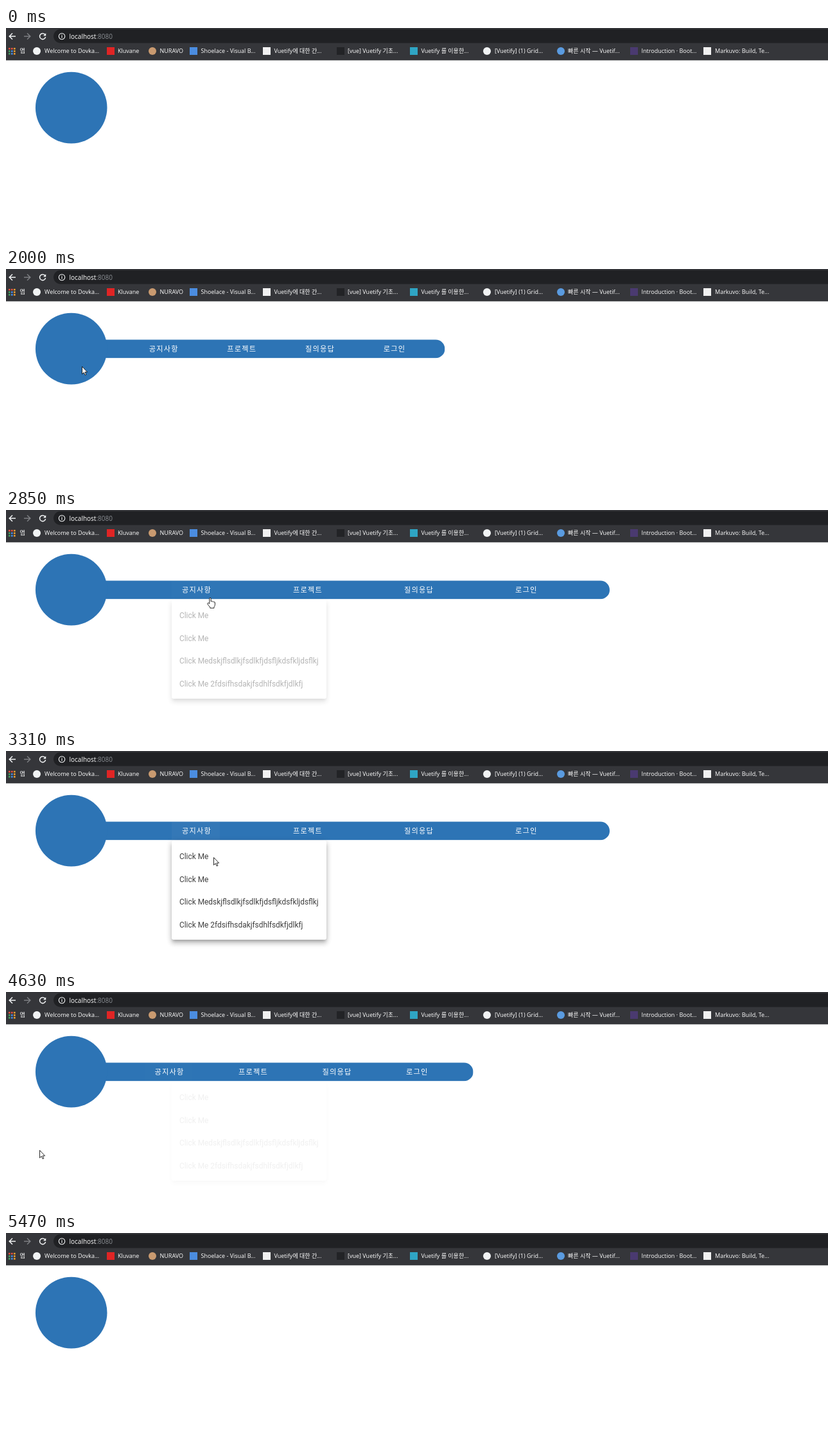
An HTML page that plays this animation: 1280 by 333 pixels, repeating every 7110 ms.

```html
<!DOCTYPE html>
<html lang="ko">
<head>
<meta charset="utf-8">
<style>
html, body { margin: 0; width: 100%; height: 100%; overflow: hidden; background: #fff; }
svg { display: block; position: absolute; left: 0; top: 0; overflow: hidden; }
text { font-family: 'Open Sans', 'Noto Sans CJK KR', 'Noto Sans CJK', sans-serif; fill: #fff; }
#marks text { font-size: 9px; }
#labels text { font: 500 11.2px Roboto, 'Noto Sans CJK KR', 'Noto Sans CJK', sans-serif; letter-spacing: 1.2px; }
#menu {
  position: absolute; left: 258px; top: 140px; width: 241px; height: 155px;
  box-sizing: border-box; padding: 8px 12px 0; border-radius: 3px; background: #fff;
  font: 11.88px/35.7px Roboto, sans-serif; color: rgba(0,0,0,.76); white-space: nowrap;
  box-shadow: 0 4px 4px -2px rgba(0,0,0,.2), 0 6px 7px 1px rgba(0,0,0,.14), 0 2px 10px 1px rgba(0,0,0,.12);
}
</style>
</head>
<body>
<svg width="1280" height="333">
  <rect width="1280" height="50" fill="#35363a"/>
  <rect y="49.5" width="1280" height="1" fill="#292a2d"/>
  <rect x="74" y="2" width="1240" height="21.5" rx="10.75" fill="#202124"/>
  <g fill="none" stroke="#f1f3f4" stroke-width="1.5">
    <path d="M15 13H5.5M10 8.2L5.2 13l4.8 4.8"/>
    <path d="M28 13h9.5M33 8.2l4.8 4.8-4.8 4.8" stroke="#7d7f83"/>
    <path d="M60.6 10A4.6 4.6 0 1 0 61.6 14"/>
    <path d="M62.2 8v4.2H58z" fill="#f1f3f4" stroke="none"/>
    <circle cx="87" cy="13" r="4.7" stroke-width="1.1"/>
    <path d="M87 12.3v3.2M87 10.2v1.2" stroke-width="1.2"/>
  </g>
  <text x="98.5" y="16.5" font-size="10" font-weight="500">localhost<tspan fill="#8b8f94">:8080</tspan></text>
  <g id="marks"></g>
  <svg id="bar" x="75" y="110" height="29.5">
    <rect id="fill" x="0" y=".5" height="28.8" rx="14.4" fill="#2d74b5"/>
    <rect id="hover" width="75" y=".5" height="28.8" fill="#fff"/>
    <g id="labels"></g>
  </svg>
  <circle cx="101.7" cy="124.6" r="55.8" fill="#2d74b5"/>
</svg>
<div id="menu">Click Me<br>Click Me<br>Click Medskjflsdlkjfsdlkfjdsfljkdsfkljdsflkj<br>Click Me 2fdsifhsdakjfsdhlfsdkfjdlkfj</div>
<svg width="1280" height="333">
  <g id="cursor" fill="#fff" stroke="#111" stroke-width=".9" stroke-linejoin="round">
    <path id="arrow" d="M.5 .5V12.3l2.7-2.5 1.9 4.1 1.8-.8-1.9-4H8.6z"/>
    <path id="hand" d="M-1.2 9.5V1Q0-.6 1.2 1V6Q2.4 5 3.4 6.3 4.7 5.4 5.5 6.8 7.3 6.2 7.4 8V11.5Q7 13.5 6 14.5V16.3H-.2V15Q-2.6 12.6-4.2 9.8-4.2 7.6-2.4 8.4z"/>
  </g>
</svg>
<script>
const $ = id => document.getElementById(id);
const LOOP = 7110, FIRST = 910, STEP = 77, FULL = 865;
const ENTER = 1573, OPEN = 2794, LEAVE = 4428, GONE = 5453;

// Bookmarks: icon x, icon colour, round?, text x, title
const marks = [
  [42, '#f1f3f4', 1, 60, 'Welcome to Dovka...'],
  [157, '#e02525', 0, 174, 'Kluvane'],
  [222, '#c99a70', 1, 239.5, 'NURAVO'],
  [286, '#4b8de0', 0, 303.5, 'Shoelace - Visual B...'],
  [400, '#f1f1f1', 0, 417.5, 'Vuetify에 대한 간...'],
  [515, '#222326', 0, 532, '[vue] Vuetify 기초...'],
  [629, '#2fa5c4', 0, 646.5, 'Vuetify 를 이용한...'],
  [743, '#f1f3f4', 1, 761, '[Vuetify] (1) Grid...'],
  [858, '#5a9be0', 1, 875, '빠른 시작 — Vuetif...'],
  [972, '#4a3a70', 0, 989.5, 'Introduction · Boot...'],
  [1086, '#f1f1f1', 0, 1104, 'Markuvo: Build, Te...']
];
const dots = ['#e8503f', '#e8503f', '#f0a030', '#45a060', '#4a8de8', '#f0a030', '#45a060', '#4a8de8', '#f0a030'];
$('marks').innerHTML =
  dots.map((c, i) => `<rect x="${4 + i % 3 * 4}" y="${31 + (i / 3 | 0) * 4}" width="2.6" height="2.6" fill="${c}"/>`).join('') +
  '<text x="21.5" y="39.3">앱</text>' +
  marks.map(([x, c, round, tx, s]) =>
    `<rect x="${x}" y="30" width="12" height="12" rx="${round ? 6 : 0}" fill="${c}"/><text x="${tx}" y="39.3">${s}</text>`).join('');

$('labels').innerHTML = ['공지사항', '프로젝트', '질의응답', '로그인'].map(s => `<text y="18.8">${s}</text>`).join('');
const labels = [...$('labels').children];

// Pointer path: time, x, y
const path = [
  [910, 228, 322], [1220, 190, 262], [1526, 126, 192], [1603, 122, 162], [1680, 118, 152],
  [2142, 118, 152], [2373, 140, 146], [2604, 205, 138], [2758, 290, 134], [2835, 318, 137],
  [2989, 320, 138], [3066, 320, 138], [3143, 321, 148], [3297, 323, 166], [3759, 330, 209],
  [4298, 330, 209], [4375, 300, 212], [4606, 52, 247], [5299, 52, 247], [5376, 71, 261], [5500, 71, 261]
];

function bezier(x1, y1, x2, y2) {
  const at = (a, b, u) => 3 * a * u * (1 - u) ** 2 + 3 * b * u * u * (1 - u) + u ** 3;
  return t => {
    if (t <= 0) return 0;
    if (t >= 1) return 1;
    let lo = 0, hi = 1;
    for (let i = 0; i < 24; i++) {
      const mid = (lo + hi) / 2;
      if (at(x1, x2, mid) < t) lo = mid; else hi = mid;
    }
    return at(y1, y2, lo);
  };
}
const ease = bezier(.25, .1, .25, 1), fade = bezier(.25, .8, .5, 1);

function pointer(t) {
  const i = Math.max(1, path.findIndex(p => p[0] > t));
  const [t0, x0, y0] = path[i - 1], [t1, x1, y1] = path[i];
  const k = (t - t0) / (t1 - t0);
  return [x0 + (x1 - x0) * k, y0 + (y1 - y0) * k];
}

function draw(now) {
  const t = FIRST + Math.floor((now % LOOP - FIRST) / STEP) * STEP;

  const width = FULL * (ease((t - ENTER) / 1000) - ease((t - LEAVE) / 1000));
  const gap = width / 5;
  $('bar').setAttribute('width', width);
  $('fill').setAttribute('width', width);
  labels.forEach((l, i) => l.setAttribute('x', 26 + gap * (i + 1)));

  const shown = fade((t - OPEN) / 300) - fade((t - LEAVE) / 300);
  $('menu').style.opacity = shown;
  $('hover').setAttribute('x', 10 + gap);
  $('hover').setAttribute('opacity', .03 * shown);

  const visible = t >= FIRST && t < GONE;
  $('cursor').style.display = visible ? '' : 'none';
  if (visible) {
    const hand = t >= 2758 && t < 3143;
    $('cursor').setAttribute('transform', `translate(${pointer(t)})`);
    $('arrow').style.display = hand ? 'none' : '';
    $('hand').style.display = hand ? '' : 'none';
  }
}

const start = performance.now();
function tick() {
  draw(performance.now() - start);
  requestAnimationFrame(tick);
}
tick();
</script>
</body>
</html>
```
